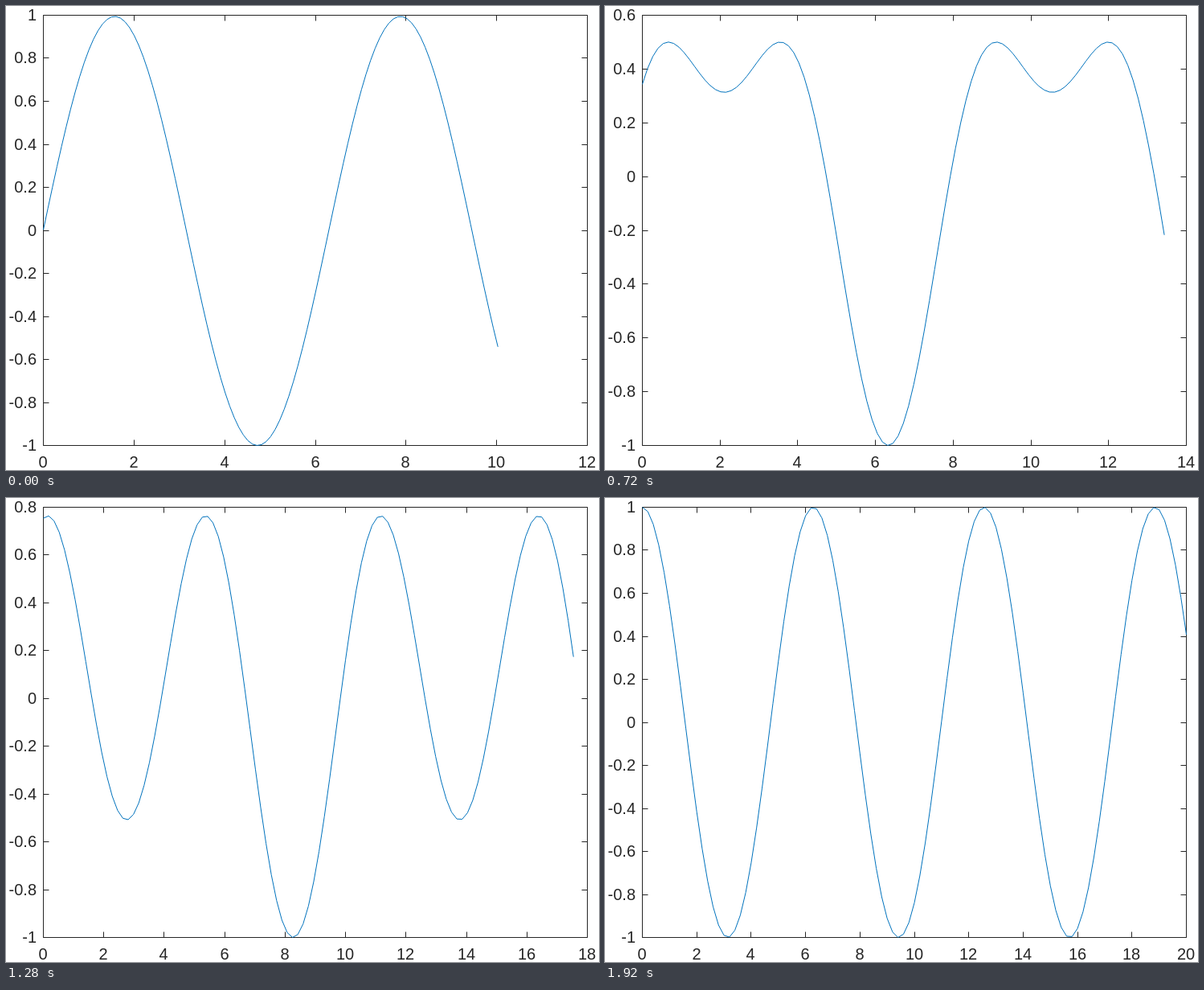
These frames come from a looping animation (738x577 px, 2 s). An HTML page with a canvas:

```html
<!DOCTYPE html>
<html lang="en">
<head>
<meta charset="utf-8">
<title>Sine to cosine</title>
<style>
html, body { margin: 0; width: 738px; height: 577px; overflow: hidden; background: #fff; }
canvas { display: block; }
</style>
</head>
<body>
<canvas id="plot" width="738" height="577"></canvas>
<script>
const ctx = document.getElementById('plot').getContext('2d');
const box = { left: 46.5, top: 11.5, right: 723.5, bottom: 546.5 };
const boxW = box.right - box.left, boxH = box.bottom - box.top;
const STEP = 80, STEPS = 25, POINTS = 100, TICK = 7;
const AXIS = '#262626', LINE = '#0072bd';

const smooth = u => u * u * (3 - 2 * u);
const mix = (a, b, w) => a + (b - a) * w;
const ceilTo = (v, unit) => Math.ceil(v / unit - 1e-9) * unit;
const crisp = v => Math.floor(v) + 0.5;

// Blend sin on 0..10 into cos on 0..20, point by point.
function curve(w) {
  return Array.from({ length: POINTS + 1 }, (_, i) => {
    const a = i / 10, b = i / 5;
    return [mix(a, b, w), mix(Math.sin(a), Math.cos(b), w)];
  });
}

function segment(x1, y1, x2, y2) {
  ctx.moveTo(x1, y1);
  ctx.lineTo(x2, y2);
}

function drawAxes(xMax, yMax, toX, toY) {
  ctx.strokeStyle = ctx.fillStyle = AXIS;
  ctx.lineWidth = 1;
  ctx.font = '20px "Liberation Sans", Arial, sans-serif';
  ctx.textBaseline = 'alphabetic';
  ctx.beginPath();
  ctx.rect(box.left, box.top, boxW, boxH);

  ctx.textAlign = 'center';
  for (let v = 0; v <= xMax; v += 2) {
    const x = crisp(toX(v));
    segment(x, box.top, x, box.top + TICK);
    segment(x, box.bottom, x, box.bottom - TICK);
    ctx.fillText(v, x - 0.5, 574);
  }

  ctx.textAlign = 'right';
  const rows = Math.round((yMax + 1) * 5);
  for (let i = 0; i <= rows; i++) {
    const v = (i - 5) / 5, y = crisp(toY(v));
    segment(box.left, y, box.left + TICK, y);
    segment(box.right, y, box.right - TICK, y);
    ctx.fillText(v, 38, y + 6.5);
  }
  ctx.stroke();
}

function draw(step) {
  const pts = curve(smooth((4 * step + 3) / 99));
  const xMax = Math.round(ceilTo(pts[POINTS][0], 2));
  const yMax = ceilTo(Math.max(...pts.map(p => p[1])), 0.2);
  const toX = v => box.left + v / xMax * boxW;
  const toY = v => box.top + (yMax - v) / (yMax + 1) * boxH;

  ctx.fillStyle = '#fff';
  ctx.fillRect(0, 0, 738, 577);
  drawAxes(xMax, yMax, toX, toY);

  ctx.strokeStyle = LINE;
  ctx.lineJoin = 'round';
  ctx.beginPath();
  for (const [x, y] of pts) ctx.lineTo(toX(x), toY(y));
  ctx.stroke();
}

const start = performance.now();
function tick() {
  draw(Math.floor((performance.now() - start) / STEP) % STEPS);
  requestAnimationFrame(tick);
}
tick();
</script>
</body>
</html>
```
